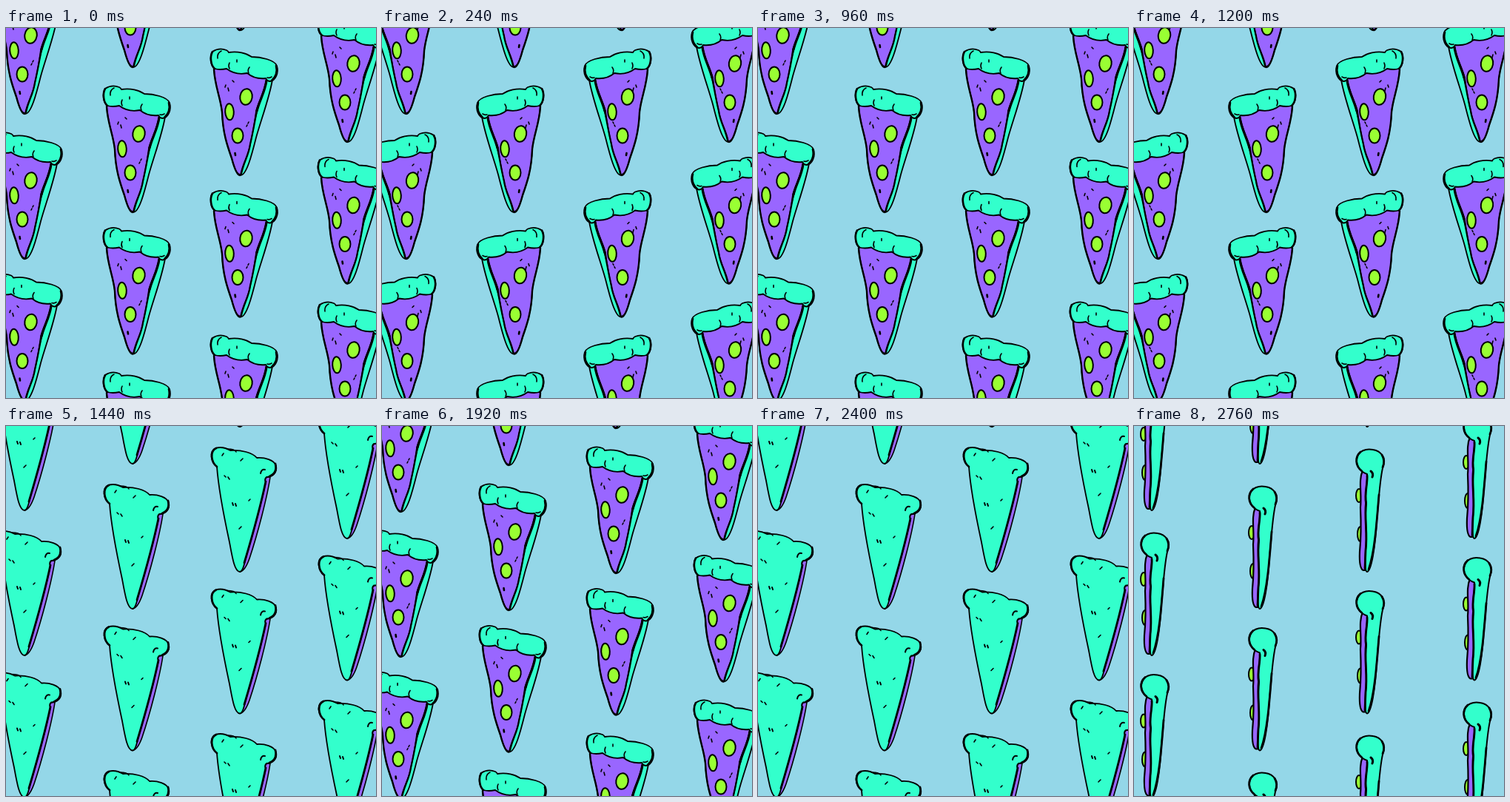
Recreate the animation shown at these times as an HTML page with a canvas. Size 500 px wide and 500 px high, loop 2880 ms.

```html
<!DOCTYPE html>
<html>
<head>
<meta charset="utf-8">
<style>
  html, body { margin: 0; width: 100%; height: 100%; overflow: hidden; background: #94d7e8; }
  canvas { display: block; }
</style>
</head>
<body>
<canvas id="stage" width="500" height="500"></canvas>
<script>
const ctx = document.getElementById('stage').getContext('2d');
const BLUE = '#94d7e8', TEAL = '#33ffcc', PURPLE = '#9966ff', GREEN = '#99ff33';
const STEP = 120, MIRROR_X = 350;
const COLUMNS = [[-146, 63], [0, 0], [145, -50], [290, -95]];
const ROWS = [-196, 0, 191.5, 387];

function line(d, width = 1.6) {
  ctx.lineWidth = width;
  ctx.stroke(new Path2D(d));
}

function shape(color, d, width = 1.8) {
  ctx.fillStyle = color;
  ctx.fill(new Path2D(d));
  line(d, width);
}

function olive(x, y, rx, ry, turn = 0) {
  ctx.beginPath();
  ctx.ellipse(x, y, rx, ry, turn, 0, 7);
  ctx.fillStyle = GREEN;
  ctx.fill();
  ctx.lineWidth = 2;
  ctx.stroke();
}

function olives(x1, x2, x3) {
  olive(x1, 143, 8.2, 10.8, 0.15);
  olive(x2, 163.3, 5.8, 11, -0.05);
  olive(x3, 195.5, 7.5, 10);
}

function frontAngled() {
  shape(TEAL, 'M206 117L215 120C211 144 200 173 193 198C187 222 180 249 172 249Z');
  shape(PURPLE, 'M136 104C137 128 145 144 147 164C148 192 154 209 160 226Q166 249 172 248C175 232 183 222 185 207C189 190 191 177 193 162C197 147 204 138 207 118L180 106Z', 1.6);
  line('M136 106C137 128 145 144 147 164C148 192 154 209 160 226Q166 249 171 249', 2.4);
  line('M207 121C205 136 198 147 194 162', 3.2);
  line('M194 162C191 177 189 190 185 207C183 222 176 232 173 247', 2.2);
  shape(TEAL, 'M137 105C131 101 130 88 134 82Q143 76 153 80Q155 81 156 83C168 81 180 84 187 89C199 89 218 93 221 101C224 111 219 121 212 122Q208 122 206 118C197 119 188 117 181 111C171 113 161 111 153 105Q144 107 137 105Z');
  line('M134 82C130 89 132 101 137 105M220 101Q223 113 214 121', 2.6);
  line('M146 81Q140 84 141 91M157 97Q155 101 157 105M167 93L167 96M184 103Q181 107 183 111M208 117Q211 118 214 116');
  line('M152 127L151 130M155 131L156 135M161 121L163 123M180 183L181 181M182 179L183 177');
  line('M164.5 219L165 222', 2.6);
}

function front() {
  shape(PURPLE, 'M127 108C133 143 147 181 157 213C163 233 167 249 174 249C181 249 185 231 190 213C202 176 216 142 222 108Z', 2.4);
  shape(TEAL, 'M128 111C120 107 119 90 127 85Q137 79 146 84C157 79 173 80 181 84C192 79 212 79 221 86C230 92 230 107 222 112Q212 115 203 110C193 114 178 114 170 110C160 114 150 113 144 109Q136 114 128 111Z');
  line('M127 85Q119 95 126 110M223 88Q230 100 222 112', 2.6);
  line('M147 98Q143 103 147 108M172 94L172 97M202 102Q198 106 202 110');
  line('M147 127L146 130M151 131L152 135M163 121L165 123M189 183L190 181M192 179L193 177');
  line('M170 219L170 222', 2.6);
}

function backAngled() {
  shape(PURPLE, 'M205 119L212 119C208 146 195 196 184 229Q178 246 171 247Z', 1.6);
  shape(TEAL, 'M140 105C132 98 129 85 138 80Q148 77 158 83C173 82 188 86 194 93C204 92 218 96 220 104C222 114 214 119 207 119Q204 121 206 126C199 159 188 198 178 232Q175 247 171 247C164 247 161 229 157 207C149 170 142 134 140 105Z');
  line('M139 80C130 84 132 99 140 105M219 101Q222 114 211 118M206 125C199 159 188 198 177 235', 2.8);
  line('M154 81Q164 81 166 85M208 119Q204 121 206 126');
  line('M199 114Q200 108 205 109M161 154L162 157M165 155L166 158', 2);
  line('M147 90L149 87M172 97L175 94M150 117L152 119M155 119L157 122M183 151L185 149M170 189L173 186');
}

function back() {
  shape(TEAL, 'M133 107C120 106 118 88 128 84Q138 79 147 84C160 79 185 79 197 84C208 79 222 82 225 91C228 102 222 107 215 108C210 142 197 180 187 216Q180 247 174 247C166 247 163 227 158 208C148 172 137 138 133 107Z', 2);
  line('M128 84Q119 94 128 106M224 89Q228 101 218 107', 2.8);
  line('M142 83Q151 83 154 87M191 83Q200 83 204 87');
  line('M161 154L162 157M166 155L167 158', 2);
  line('M139 92L141 89M173 97L176 94M208 96L206 93M145 117L147 119M151 119L153 122M190 151L192 149M172 189L175 186');
}

function side() {
  olive(159, 144, 4, 9);
  olive(161, 196, 4, 10);
  shape(PURPLE, 'M164 110C158 124 163 141 161 160C162 183 162 200 160 220Q159 243 165 245L170 245L176 112Z', 2.2);
  shape(TEAL, 'M170 115C161 112 155 104 156 95C158 83 169 80 178 82C190 84 195 94 192 103C187 120 186 150 183 178C181 212 176 246 170 247C167 247 167 231 168 218C171 194 166 177 169 154C166 141 171 126 170 115Z', 2);
  line('M163 111C154 104 153 92 161 85M190 89Q195 97 191 106', 2.8);
  line('M186 143C183 182 180 222 172 244M170 117C171 128 166 141 168.5 154C166 177 171 194 168 218L167 243', 2.8);
  line('M175 111Q179 114 177 119', 3);
}

function flip(draw) {
  return () => {
    ctx.save();
    ctx.transform(-1, 0, 0, 1, MIRROR_X, 0);
    draw();
    ctx.restore();
  };
}

const POSES = [
  () => { frontAngled(); olives(179.5, 157, 168); },
  () => { front(); olives(184, 157, 173); },
  () => { flip(frontAngled)(); olives(187, 166, 180); },
  flip(side), backAngled, back, flip(backAngled), side
];

function render() {
  const pose = POSES[Math.floor(performance.now() / STEP) % POSES.length];
  ctx.fillStyle = BLUE;
  ctx.fillRect(0, 0, 500, 500);
  ctx.strokeStyle = '#000';
  ctx.lineCap = ctx.lineJoin = 'round';
  for (const [x, y] of COLUMNS) {
    for (const row of ROWS) {
      ctx.save();
      ctx.translate(x, y + row);
      pose();
      ctx.restore();
    }
  }
  requestAnimationFrame(render);
}
render();
</script>
</body>
</html>
```
